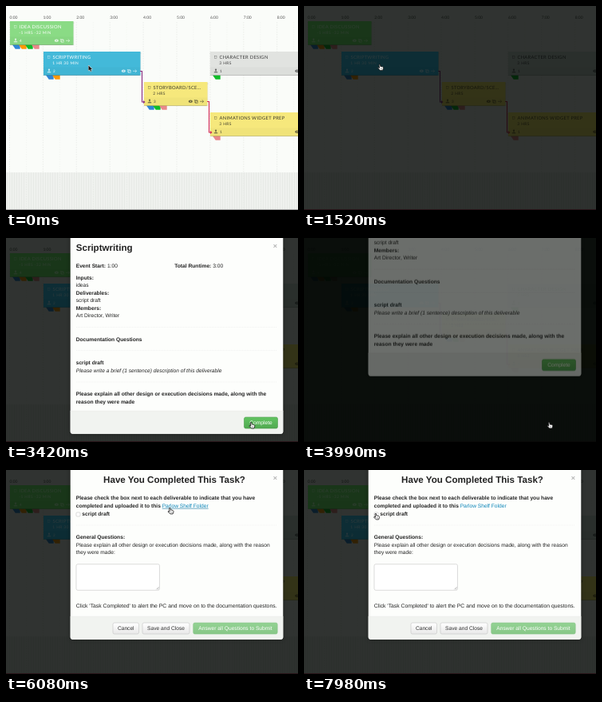
An HTML page with a canvas that plays this animation: 366x255 px, repeating every 8 s.

```html
<!DOCTYPE html>
<html lang="en">
<head>
<meta charset="utf-8">
<title>Task board</title>
<style>
  html, body { margin: 0; width: 100%; height: 100%; overflow: hidden; background: #fafcf9; }
  canvas { display: block; }
</style>
</head>
<body>
<canvas id="stage" width="366" height="255"></canvas>
<script>
const W = 366, H = 255, LOOP = 8000, STEP = 190, HOUR = 41.9;
const SANS = '"Liberation Sans", Arial, sans-serif';
const BODY = `6.65px ${SANS}`, BOLD = `bold 6.67px ${SANS}`, ITALIC = `italic ${BODY}`;
const NOTE = `6.82px ${SANS}`, HEADING = `bold 11.6px ${SANS}`;
const LINK_NAME = 'Parlow Shelf Folder';
const stage = document.getElementById('stage').getContext('2d');

const clamp = v => Math.max(0, Math.min(1, v));
const ramp = (t, start, length) => clamp((t - start) / length);
const easeOut = p => 1 - (1 - p) ** 1.6;

function rect(g, x, y, w, h, fill) {
  g.fillStyle = fill;
  g.fillRect(x, y, w, h);
}

function text(g, str, x, y, font = BODY, fill = '#222', align = 'left', spacing = 0) {
  g.textRendering = 'geometricPrecision';
  g.letterSpacing = spacing + 'px';
  g.font = font;
  g.fillStyle = fill;
  g.textAlign = align;
  g.fillText(str, x, y);
  return x + g.measureText(str).width;
}

function path(g, points, { fill, stroke, width = 1, close = false }) {
  g.beginPath();
  points.forEach(([x, y]) => g.lineTo(x, y));
  if (close) g.closePath();
  if (fill) { g.fillStyle = fill; g.fill(); }
  if (stroke) { g.strokeStyle = stroke; g.lineWidth = width; g.stroke(); }
}

function roundBox(g, x, y, w, h, r, fill, stroke) {
  g.beginPath();
  g.roundRect(x, y, w, h, r);
  g.fillStyle = fill;
  g.fill();
  if (stroke) { g.strokeStyle = stroke; g.lineWidth = 0.6; g.stroke(); }
}

// ---------- board ----------
const BLUE = '#2f86d6', ORANGE = '#ff9808', GREEN = '#0fbd28', PINK = '#e8888a';
const cards = [
  { x: 5, y: 19, w: 79.5, title: 'IDEA DISCUSSION', sub: '-1 HRS -32 MIN', count: 4,
    fill: '#8adb85', ink: '#fff', tint: '0,170,0', tabs: [BLUE, ORANGE, GREEN, PINK] },
  { x: 47, y: 57, w: 121.5, title: 'SCRIPTWRITING', sub: '1 HR 30 MIN', count: 2,
    fill: '#43b9d9', ink: '#fff', tint: '0,130,180', tabs: [BLUE, ORANGE] },
  { x: 173, y: 95, w: 79.5, title: 'STORYBOARD/SCE...', sub: '2 HRS', count: 3,
    fill: '#f6e87c', ink: '#3d3b2c', tint: '100,90,0', tabs: [BLUE, GREEN, PINK] },
  { x: 256, y: 57, w: 130, title: 'CHARACTER DESIGN', sub: '3 HRS', count: 1,
    fill: '#e1e3e0', ink: '#3c3c3c', tint: '40,45,42', tabs: [GREEN] },
  { x: 256, y: 133, w: 130, title: 'ANIMATIONS WIDGET PREP', sub: '3 HRS', count: 1,
    fill: '#f6e87c', ink: '#3d3b2c', tint: '100,90,0', tabs: [PINK] },
];

function drawIcons(g, left, right, mid, ink, fill) {
  g.globalAlpha = 0.75;
  g.fillStyle = g.strokeStyle = ink;
  g.beginPath();
  g.arc(left + 7, mid - 1.6, 1.1, 0, 7);
  g.fill();
  g.fillRect(left + 6.6, mid - 1, 0.8, 2);
  g.fillRect(left + 4.8, mid + 0.9, 4.4, 1.1);
  const x = right - 24;
  g.beginPath();
  g.ellipse(x + 2.8, mid, 2.6, 1.7, 0, 0, 7);
  g.fill();
  g.lineWidth = 0.5;
  g.strokeRect(x + 7.7, mid - 2, 3, 3);
  g.strokeRect(x + 9, mid - 0.8, 3, 3);
  path(g, [[x + 14.5, mid], [x + 19, mid]], { stroke: ink, width: 0.7 });
  path(g, [[x + 17.3, mid - 1.8], [x + 19.2, mid], [x + 17.3, mid + 1.8]], { stroke: ink, width: 0.7 });
  rect(g, x + 2.2, mid - 0.6, 1.3, 1.3, fill);
  g.globalAlpha = 1;
}

function drawCard(g, { x, y, w, title, sub, count, fill, ink, tabs }) {
  tabs.forEach((color, i) => {
    const left = x + 2.7 + i * 8;
    path(g, [[left, y + 29], [left + 10, y + 29], [left + 10, y + 34.8], [left + 4, y + 34.8]],
      { fill: color, close: true });
  });
  g.save();
  g.shadowColor = 'rgba(0,0,0,.25)';
  g.shadowBlur = 1.5;
  g.shadowOffsetY = 0.5;
  rect(g, x, y, w, 29.7, fill);
  g.restore();
  rect(g, x, y + 19.5, w, 10.2, 'rgba(0,0,0,.025)');
  rect(g, x, y + 29, w, 0.8, 'rgba(0,0,0,.12)');
  g.strokeStyle = ink;
  g.lineWidth = 0.3;
  g.strokeRect(x + 5.2, y + 5.5, 2.8, 2.8);
  text(g, title, x + 11.5, y + 9, '5.8px Lato, sans-serif', ink, 'left', 0.28);
  text(g, sub, x + 11.3, y + 15.7, '4.9px Lato, sans-serif', ink, 'left', 0.38);
  drawIcons(g, x, x + w, y + 24.3, ink, fill);
  text(g, count, x + 12, y + 26.2, '4.6px Lato, sans-serif', ink);
}

function drawConnector(g, x, top, bottom, color) {
  path(g, [[x - 2.5, top], [x, top], [x, bottom], [x + 3, bottom]], { stroke: color, width: 1.1 });
  path(g, [[x + 1.5, bottom - 2], [x + 4, bottom], [x + 1.5, bottom + 2]], { fill: color, close: true });
}

function drawBoard(g) {
  rect(g, 0, 0, W, H, '#fafcf9');
  rect(g, 0, 208, W, 46, '#eff1ee');
  for (let x = 1; x < W; x += 3) rect(g, x, 208, 0.7, 46, '#e4e7e3');
  g.setLineDash([1.5, 1.5]);
  for (let hour = 0; hour < 9; hour++) {
    const x = 4.5 + hour * HOUR;
    path(g, [[x, 20], [x, 254]], { stroke: '#e7eae6', width: 0.8 });
    path(g, [[x + HOUR / 2, 20], [x + HOUR / 2, 254]], { stroke: '#f3f5f2', width: 0.8 });
    text(g, hour + ':00', x, 16.4, '5px Lato, sans-serif', '#555');
  }
  g.setLineDash([]);
  cards.forEach(card => drawCard(g, card));
  drawConnector(g, 170.5, 81.5, 120, '#8a2c80');
  drawConnector(g, 254.5, 119.5, 158, '#d62a52');
  rect(g, 0, 254, W, 1, '#a0a0a0');
}

function drawDim(g, amount) {
  rect(g, 0, 0, W, H, `rgba(2,6,3,${0.81 * amount})`);
}

function drawDimTint(g, amount) {
  for (const { x, y, w, tint } of cards) rect(g, x, y, w, 29.7, `rgba(${tint},${0.07 * amount})`);
  rect(g, 0, 254, W, 1, `rgba(50,8,18,${0.5 * amount})`);
}

// ---------- dialogs ----------
function layer(draw) {
  const canvas = document.createElement('canvas');
  canvas.width = W;
  canvas.height = H;
  draw(canvas.getContext('2d'));
  return canvas;
}

function drawPanel(g, bottom) {
  g.save();
  g.shadowColor = 'rgba(0,0,0,.4)';
  g.shadowBlur = 5;
  roundBox(g, 80.7, -20, 266.6, bottom + 20, 3, '#fdfefc');
  g.restore();
  roundBox(g, 80.7, bottom - 28.8, 266.6, 28.8, [0, 0, 3, 3], '#f1f3f0');
  rect(g, 80.7, bottom - 29, 266.6, 0.5, '#e6e9e5');
  text(g, '×', 337.3, 12.7, `bold 9px ${SANS}`, '#b4b4b4', 'center');
}

function drawDivider(g, y) {
  g.setLineDash([1, 1]);
  path(g, [[88, y], [340, y]], { stroke: '#e4e4e4', width: 0.5 });
  g.setLineDash([]);
}

function drawButton(g, label, x, y, w, colors, ink, border) {
  const gradient = g.createLinearGradient(0, y, 0, y + 14);
  colors.forEach((color, i) => gradient.addColorStop(i, color));
  roundBox(g, x, y, w, 14, 2, gradient, border);
  text(g, label, x + w / 2, y + 9.4, BODY, ink, 'center');
}

const scriptDialog = layer(g => {
  drawPanel(g, 244.8);
  text(g, 'Scriptwriting', 87.7, 15.7, HEADING);
  const field = (label, value, x) => text(g, value, text(g, label + ' ', x, 37.3, BOLD), 37.3);
  field('Event Start:', '1:00', 87.7);
  field('Total Runtime:', '3:00', 211.2);
  ['Inputs:', 'ideas', 'Deliverables:', 'script draft', 'Members:', 'Art Director, Writer']
    .forEach((line, i) => text(g, line, 87.7, 51.7 + i * 9.5, i % 2 ? BODY : BOLD));
  [111.5, 140.5, 180].forEach(y => drawDivider(g, y));
  text(g, 'Documentation Questions', 87.7, 128.8, BOLD);
  text(g, 'script draft', 87.7, 158.3, BOLD);
  text(g, 'Please write a brief (1 sentence) description of this deliverable', 87.7, 167.8, ITALIC);
  text(g, 'Please explain all other design or execution decisions made, along with the', 87.7, 197.3, BOLD);
  text(g, 'reason they were made', 87.7, 206.8, BOLD);
  drawButton(g, 'Complete', 298.5, 224, 42, ['#62c462', '#51a951'], '#fff', '#4b9c4b');
});

let linkStart, linkEnd;
const confirmDialog = layer(g => {
  drawPanel(g, 211.8);
  text(g, 'Have You Completed This Task?', 211, 15.7, HEADING, '#222', 'center');
  text(g, 'Please check the box next to each deliverable to indicate that you have', 87.7, 37.4, BOLD);
  linkStart = text(g, 'completed and uploaded it to this ', 87.7, 47, BOLD);
  linkEnd = text(g, LINK_NAME, linkStart, 47, BODY, '#0a84b8');
  roundBox(g, 88, 53, 5, 5, 1, '#fff', '#c4c4c4');
  text(g, 'script draft', 95.3, 56.6, BOLD);
  drawDivider(g, 69);
  text(g, 'General Questions:', 87.7, 86.2, BOLD);
  text(g, 'Please explain all other design or execution decisions made, along with the reason', 87.7, 95.6);
  text(g, 'they were made:', 87.7, 105.1);
  roundBox(g, 88, 117.7, 104.5, 32.6, 2, '#fff', '#c4c4c4');
  path(g, [[188.5, 149.3], [191.5, 146.3]], { stroke: '#888', width: 0.6 });
  path(g, [[190.2, 149.3], [191.5, 148]], { stroke: '#888', width: 0.6 });
  text(g, "Click 'Task Completed' to alert the PC and move on to the documentation questons.", 87.7, 171.8, NOTE);
  const plain = ['#ffffff', '#e8e8e8'];
  drawButton(g, 'Cancel', 134, 191, 32.5, plain, '#333', '#c4c4c4');
  drawButton(g, 'Save and Close', 171, 191, 59, plain, '#333', '#c4c4c4');
  drawButton(g, 'Answer all Questions to Submit', 234.7, 191, 105.5, ['#93d293', '#87c787'], '#fff', '#8ac48a');
});

function slideDialog(g, dialog, entering, leaving) {
  const shift = leaving ? easeOut(leaving) : 1 - easeOut(entering);
  g.globalAlpha = entering * (1 - leaving);
  g.drawImage(dialog, 0, -94 * shift);
  g.globalAlpha = 1;
}

// ---------- pointer ----------
const route = [
  [0, 103.5, 74.5], [190, 103.5, 74.5], [950, 95, 73], [2470, 95, 73], [3230, 307.3, 230.5],
  [4750, 307.3, 230.5], [5700, 205.5, 47.5], [6840, 205.5, 47.5], [7410, 90, 54.5], [LOOP, 90, 54.5],
];
const handTimes = [[760, 2470], [3230, 4180], [5700, 6840], [7410, LOOP]];

function pointerAt(t) {
  const i = route.findIndex(([time]) => time > t);
  const [t0, x0, y0] = route[i - 1], [t1, x1, y1] = route[i];
  const p = (t - t0) / (t1 - t0), k = p * p * (3 - 2 * p);
  return [x0 + (x1 - x0) * k, y0 + (y1 - y0) * k];
}

const ARROW = [[0, 0], [0, 7], [1.7, 5.5], [2.9, 8.2], [4.1, 7.6], [2.9, 5.1], [5.1, 5]];
const HAND = [[-0.8, 0], [0.5, 0], [1, 3], [2.2, 2.7], [2.8, 3.3], [4, 3.2], [5, 4.2], [5, 6],
  [4.1, 8.4], [0.4, 8.4], [-2.8, 5.2], [-2.3, 4.4], [-0.5, 5.3], [-1.1, 0.8]];

function drawPointer(g, t) {
  const isHand = handTimes.some(([from, to]) => t >= from && t < to);
  g.save();
  g.translate(...pointerAt(t));
  g.scale(0.88, 0.88);
  g.lineJoin = 'round';
  if (isHand) {
    path(g, HAND, { fill: '#fff', stroke: '#111', width: 0.9, close: true });
    path(g, [[1.3, 5.3], [1.3, 7]], { stroke: '#333', width: 0.5 });
    path(g, [[2.9, 5.3], [2.9, 7]], { stroke: '#333', width: 0.5 });
  } else {
    path(g, ARROW, { stroke: '#ddd', width: 1.2, close: true });
    path(g, ARROW, { fill: '#111', close: true });
  }
  g.restore();
}

// ---------- playback ----------
const board = layer(drawBoard);

function render(t) {
  const g = stage;
  g.drawImage(board, 0, 0);
  const firstDim = ramp(t, 1280, 150);
  const secondDim = ramp(t, 3810, 150) - ramp(t, 4110, 150);
  drawDim(g, firstDim);
  drawDimTint(g, firstDim);
  drawDim(g, secondDim);
  slideDialog(g, scriptDialog, ramp(t, 1530, 300), ramp(t, 3810, 300));
  slideDialog(g, confirmDialog, ramp(t, 4000, 300), 0);
  if (t >= 5700 && t < 6840) rect(g, linkStart, 47.8, linkEnd - linkStart, 0.6, '#0a6f9c');
  drawPointer(g, t);
}

function tick(now) {
  render(Math.floor((now % LOOP) / STEP) * STEP);
  requestAnimationFrame(tick);
}
requestAnimationFrame(tick);
</script>
</body>
</html>
```
